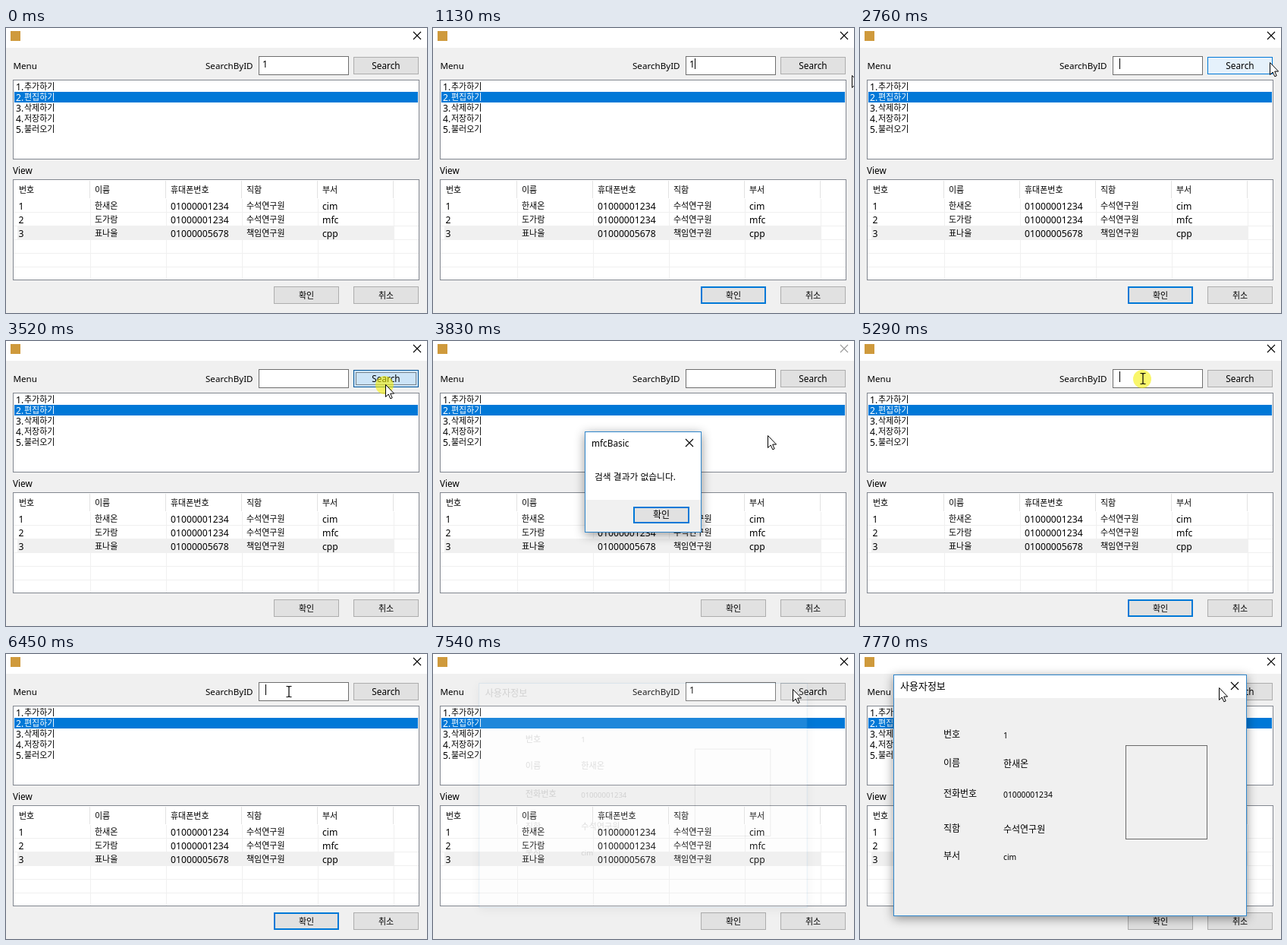
Animation, 555 px wide and 375 px high, one loop 8000 ms. Source, as an HTML page:

```html
<!DOCTYPE html>
<html lang="ko">
<head>
<meta charset="utf-8">
<title>Search by ID</title>
<style>
  html, body { margin: 0; width: 100%; height: 100%; overflow: hidden; background: #f0f0f0; }
  svg { display: block; }
  text { font-family: 'Noto Sans', 'Noto Sans CJK KR', 'Noto Sans CJK', sans-serif; white-space: pre; }
  .dialog { filter: drop-shadow(0 3px 7px rgba(0, 0, 0, .42)); }
</style>
</head>
<body>
<svg id="stage" width="555" height="375" viewBox="0 0 555 375"></svg>
<script>
const LOOP = 8000, STEP = 77;
const stage = document.getElementById('stage');

function el(tag, attrs, parent = stage) {
  const node = document.createElementNS('http://www.w3.org/2000/svg', tag);
  set(node, attrs);
  parent.appendChild(node);
  return node;
}
function set(node, attrs) {
  for (const k in attrs) node.setAttribute(k, attrs[k]);
}
function show(node, on) {
  node.style.display = on ? '' : 'none';
}
function fill(x, y, w, h, color, parent) {
  return el('rect', { x, y, width: w, height: h, fill: color }, parent);
}
function box(x, y, w, h, color, line, parent) {
  return el('rect', { x: x + .5, y: y + .5, width: w - 1, height: h - 1, fill: color, stroke: line }, parent);
}
function label(x, y, str, size, parent, extra = {}) {
  const node = el('text', { x, y, 'font-size': size, fill: '#000', ...extra }, parent);
  node.textContent = str;
  return node;
}
function cross(cx, cy, parent) {
  return el('path', {
    d: `M${cx - 5} ${cy - 5}l10 10m0 -10l-10 10`, stroke: '#000', 'stroke-width': 1.1, fill: 'none'
  }, parent);
}

const LOOKS = {
  normal: ['#e1e1e1', '#adadad', 1],
  ring: ['#e1e1e1', '#0078d7', 2],
  hover: ['#e5f1fb', '#0078d7', 1],
  pressed: ['#cce4f7', '#005499', 1]
};
function button(x, y, w, h, str, size, parent) {
  const face = el('rect', {}, parent);
  const dots = el('rect', {
    x: x + 3.5, y: y + 3.5, width: w - 7, height: h - 7,
    fill: 'none', stroke: '#222', 'stroke-dasharray': '1 1'
  }, parent);
  label(x + w / 2, y + h / 2 + 4.2, str, size, parent, { 'text-anchor': 'middle' });
  const look = (name, dotted = false) => {
    const [color, line, t] = LOOKS[name];
    set(face, {
      x: x + t / 2, y: y + t / 2, width: w - t, height: h - t,
      fill: color, stroke: line, 'stroke-width': t
    });
    show(dots, dotted);
  };
  look('normal');
  return look;
}

// Main window
fill(0, 0, 555, 375, '#f0f0f0');
fill(0, 0, 555, 26, '#fff');
fill(6, 4, 13, 13, '#cf9a3c');
const mainCross = cross(542, 10);
label(9.5, 54, 'Menu', 11.6);
label(263, 54, 'SearchByID', 11.6);
label(9, 192, 'View', 11.8);
box(333, 37, 119, 25, '#fff', '#6e6e6e');
const entry = label(338, 52, '1', 12.2);
const caret = fill(338, 40, 1, 14, '#000');
const search = button(458, 38, 86, 23, 'Search', 11.8);
const ok = button(353, 340, 86, 23, '확인', 11);
button(458, 340, 86, 23, '취소', 11);

box(9, 68, 536, 105, '#fff', '#828790');
fill(11, 84, 532, 14, '#0078d7');
['추가하기', '편집하기', '삭제하기', '저장하기', '불러오기'].forEach((str, i) => {
  const y = 81 + 14 * i, color = { fill: i === 1 ? '#fff' : '#000' };
  label(13, y + .5, i + 1 + '.', 12.2, stage, color);
  label(24, y, str, 11, stage, color);
});

const PEOPLE = [
  ['1', '한새온', '01000001234', '수석연구원', 'cim'],
  ['2', '도가람', '01000001234', '수석연구원', 'mfc'],
  ['3', '표나울', '01000005678', '책임연구원', 'cpp']
];
box(9, 199, 536, 133, '#fff', '#828790');
fill(15, 261, 497, 17, '#f0f0f0');
for (let y = 242; y < 330; y += 18) fill(10, y, 534, 1, '#f0f0f0');
for (let x = 110; x < 520; x += 100) {
  fill(x, 201, 1, 23, '#e2e2e2');
  fill(x + 1, 225, 1, 106, '#f0f0f0');
}
['번호', '이름', '휴대폰번호', '직함', '부서'].forEach((str, i) => label(17 + 100 * i, 217, str, 11));
PEOPLE.forEach((row, r) => row.forEach((str, c) => {
  const korean = c === 1 || c === 3;
  label((c ? 17 : 16.5) + 100 * c, 238 + 18 * r + (korean ? 0 : .6), str, korean ? 11 : 12.2);
}));

// Message box
const msg = el('g', { class: 'dialog' });
box(200, 119, 154, 133, '#fff', '#2f86cc', msg);
fill(201, 209, 152, 42, '#f0f0f0', msg);
label(209, 138.5, 'mfcBasic', 11.8, msg);
const msgCross = cross(338, 134, msg);
label(213, 183, '검색 결과가 없습니다.', 11.8, msg);
const msgOk = button(264, 218, 74, 22, '확인', 12, msg);

// User details
const info = el('g', { class: 'dialog' });
box(44, 27, 466, 318, '#f0f0f0', '#2f86cc', info);
fill(45, 28, 464, 30, '#fff', info);
label(53, 46.5, '사용자정보', 13, info);
cross(494, 42, info);
box(350, 120, 108, 124, '#f0f0f0', '#6a6a6a', info);
['번호', '이름', '전화번호', '직함', '부서'].forEach((str, i) => {
  const y = [106, 144, 184, 230, 266][i] + 4.3;
  label(110, y, str, 12, info);
  label(189, y + .6, PEOPLE[0][i], i % 2 ? 12 : 10.3, info);
});

// Pointer
const glow = el('circle', { r: 12, fill: '#f4f000', 'fill-opacity': .58 });
const arrow = el('path', {
  d: 'M.5 .5V16.5L4.2 13L6.8 18.8L9.2 17.8L6.7 12.1H11.6Z', fill: '#fff', stroke: '#000'
});
const beam = el('path', {
  d: 'M-3.5 -6.5H-1L0 -5.5L1 -6.5H3.5M0 -5.5V6.5M-3.5 7.5H-1L0 6.5L1 7.5H3.5',
  fill: 'none', stroke: '#000', 'stroke-width': 1.2
});

// start, steps, from x y, to x y
const MOVES = [
  [130, 3, 311, 356, 461, 84],
  [440, 4, 444, 70, 385, 50],
  [750, 6, 405, 50, 552, 62],
  [2520, 2, 549, 61, 545, 59],
  [2760, 3, 540, 45, 506, 1],
  [2990, 5, 504, 12, 500, 57],
  [3600, 4, 497, 62, 441, 124],
  [3906, 6, 425, 140, 322, 227],
  [4757, 7, 324, 215, 373, 49],
  [7080, 4, 385, 49, 474, 46],
  [7770, 1, 473, 44, 473, 44]
];
// time, caret x (0 = hidden)
const CARET = [
  [0, 0], [670, 345], [1590, 0], [1990, 338], [2520, 0], [2600, 342], [3130, 0],
  [5290, 342], [5440, 350], [5990, 346], [6450, 342], [6530, 338], [6760, 345], [7290, 0]
];
const CLICKS = [[595, 750], [3520, 3600], [4450, 4580], [5210, 5367], [7390, 7540]];

const within = (t, a, b) => t >= a && t < b;
const ramp = (t, a, b) => Math.min(1, Math.max(0, (t - a) / (b - a)));
const last = (table, t) => table.filter(row => row[0] <= t).pop();

function pointer(t) {
  const m = last(MOVES, t);
  if (!m) return null;
  const [start, n, x0, y0, x1, y1] = m;
  const i = Math.min(n - 1, Math.floor((t - start) / STEP + .1));
  const k = n > 1 ? i / (n - 1) : 1;
  return [Math.round(x0 + (x1 - x0) * k), Math.round(y0 + (y1 - y0) * k)];
}
function over(p, x, y, w, h) {
  return !!p && p[0] >= x && p[0] < x + w && p[1] >= y && p[1] < y + h;
}
function place(node, cx, cy, alpha, scale) {
  show(node, alpha > 0);
  set(node, { opacity: alpha, transform: `translate(${cx} ${cy}) scale(${scale}) translate(${-cx} ${-cy})` });
}

function draw(t) {
  const p = pointer(t);
  const modal = within(t, 3640, 4600) || t >= 7540;
  const inEdit = within(t, 670, 3520) || within(t, 5290, 7390);
  const inSearch = within(t, 3520, 5290) || t >= 7390;
  const press = within(t, 3520, 3600) || within(t, 7390, 7465);

  ok(inEdit ? 'ring' : 'normal');
  if (press) search('pressed', true);
  else if (modal) search('normal');
  else if (over(p, 458, 38, 86, 23)) search('hover', inSearch);
  else search(inSearch ? 'ring' : 'normal', inSearch);

  show(entry, t < 1990 || t >= 6760);
  const cx = last(CARET, t)[1];
  show(caret, cx > 0);
  caret.setAttribute('x', cx);
  mainCross.setAttribute('stroke', within(t, 3640, 4600) ? '#999' : '#000');

  const opening = ramp(t, 3640, 3790), closing = ramp(t, 4600, 4760);
  place(msg, 277, 185.5, opening * (1 - closing), .92 + .08 * opening - .04 * closing);
  show(msgCross, t < 4600);
  msgOk(over(p, 264, 218, 74, 22) ? 'hover' : 'ring');
  const detail = ramp(t, 7520, 7690);
  place(info, 277, 186, detail, .92 + .08 * detail);

  const visible = p && !within(t, 6760, 7080);
  const typing = over(p, 333, 37, 119, 25) && !modal;
  show(arrow, visible && !typing);
  show(beam, visible && typing);
  show(glow, visible && CLICKS.some(c => within(t, c[0], c[1])));
  if (p) {
    const at = `translate(${p[0]} ${p[1]})`;
    set(arrow, { transform: at });
    set(beam, { transform: at });
    set(glow, { cx: p[0] - 1, cy: p[1] + 1 });
  }
}

const begin = performance.now();
function tick() {
  draw((performance.now() - begin) % LOOP);
  requestAnimationFrame(tick);
}
tick();
</script>
</body>
</html>
```
